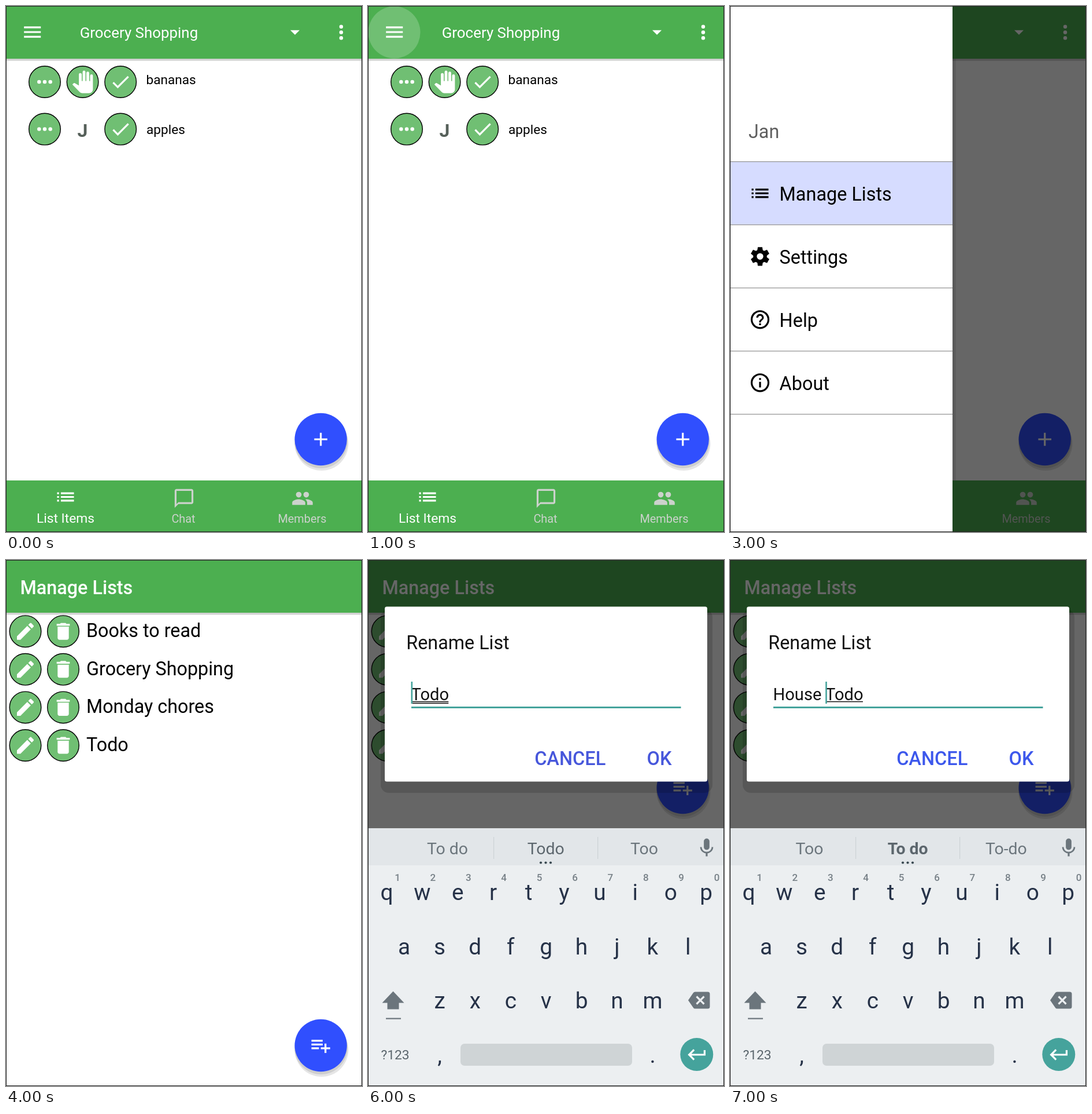
Recreate the animation shown at these times as an HTML page. Size 616 by 908 pixels, loop 8000 ms.

```html
<!DOCTYPE html>
<html lang="en">
<head>
<meta charset="utf-8">
<title>List app</title>
<style>
html, body { margin: 0; width: 616px; height: 908px; overflow: hidden; background: #fff; }
svg { display: block; font-family: Roboto, sans-serif; }
</style>
</head>
<body>
<svg id="stage" width="616" height="908" viewBox="0 0 616 908"></svg>
<script>
const GREEN = '#4caf50', SOFT = '#70bf73', BLUE = '#304ffe', TEAL = '#45a39c', GREY = '#6b757c';
const DP = 1.616; // pixels per icon unit
const STEP = 1000;

// Icon shapes on a 24 unit grid
const ring = '<circle cx="12" cy="12" r="9" fill="none" stroke="#000" stroke-width="2"/>';
const p = d => `<path d="${d}"/>`;
const dots = pts => pts.map(([x, y]) => `<circle cx="${x}" cy="${y}" r="2"/>`).join('');
const tooth = a => `<path d="M-3-6L-2.4-10H2.4L3-6z" transform="translate(12 12) rotate(${a})"/>`;
const ICONS = {
  menu: p('M3 18h18v-2H3zm0-5h18v-2H3zm0-7v2h18V6z'),
  drop: p('M7 10l5 5 5-5z'),
  more: dots([[12, 6], [12, 12], [12, 18]]),
  dots: dots([[6, 12], [12, 12], [18, 12]]),
  done: p('M9 16.2L4.8 12l-1.4 1.4L9 19 21 7l-1.4-1.4z'),
  hand: p('M23 5.5V20c0 2.2-1.8 4-4 4h-7.3c-1.08 0-2.1-.43-2.85-1.19L1 14.83s1.26-1.23 1.3-1.25c.4-.35.95-.37 1.39-.13L8 15.91V4a1.5 1.5 0 0 1 3 0v7h1V1.5a1.5 1.5 0 0 1 3 0V11h1V2.5a1.5 1.5 0 0 1 3 0V11h1V5.5a1.5 1.5 0 0 1 3 0z'),
  add: p('M19 13h-6v6h-2v-6H5v-2h6V5h2v6h6z'),
  list: p('M3 13h2v-2H3zm0 4h2v-2H3zm0-8h2V7H3zm4 4h14v-2H7zm0 4h14v-2H7zM7 7v2h14V7z'),
  chat: p('M20 2H4c-1.1 0-2 .9-2 2v18l4-4h14c1.1 0 2-.9 2-2V4c0-1.1-.9-2-2-2zm0 14H6l-2 2V4h16z'),
  people: '<circle cx="8" cy="8" r="3"/><circle cx="16" cy="8" r="3"/>' +
    p('M8 13c-2.33 0-7 1.17-7 3.5V19h14v-2.5c0-2.33-4.67-3.5-7-3.5zm8 0c-.29 0-.62.02-.97.05 1.16.84 1.97 1.97 1.97 3.45V19h6v-2.5c0-2.33-4.67-3.5-7-3.5z'),
  gear: '<circle cx="12" cy="12" r="5.4" fill="none" stroke="#000" stroke-width="3.8"/>' +
    [0, 60, 120, 180, 240, 300].map(tooth).join(''),
  help: ring + p('M11 18h2v-2h-2zM12 6c-2.21 0-4 1.79-4 4h2c0-1.1.9-2 2-2s2 .9 2 2c0 2-3 1.75-3 5h2c0-2.25 3-2.5 3-5 0-2.21-1.79-4-4-4z'),
  info: ring + p('M11 17h2v-6h-2zM11 9h2V7h-2z'),
  edit: p('M3 17.25V21h3.75L17.81 9.94l-3.75-3.75zM20.71 7.04c.39-.39.39-1.02 0-1.41l-2.34-2.34c-.39-.39-1.02-.39-1.41 0l-1.83 1.83 3.75 3.75z'),
  bin: p('M6 19c0 1.1.9 2 2 2h8c1.1 0 2-.9 2-2V7H6zM19 4h-3.5l-1-1h-5l-1 1H5v2h14z'),
  addList: p('M14 10H2v2h12zm0-4H2v2h12zm4 8v-4h-2v4h-4v2h4v4h2v-4h4v-2zM2 16h8v-2H2z'),
  mic: p('M12 14c1.66 0 3-1.34 3-3V5c0-1.66-1.34-3-3-3S9 3.34 9 5v6c0 1.66 1.34 3 3 3zm5.3-3c0 3-2.54 5.1-5.3 5.1S6.7 14 6.7 11H5c0 3.41 2.72 6.23 6 6.72V21h2v-3.28c3.28-.48 6-3.3 6-6.72z'),
  enter: p('M19 7v4H5.83l3.58-3.59L8 6l-6 6 6 6 1.41-1.41L5.83 13H21V7z')
};

const icon = (name, x, y, fill = '#fff') =>
  `<g fill="${fill}" transform="translate(${x} ${y}) scale(${DP}) translate(-12 -12)">${ICONS[name]}</g>`;
const rect = (x, y, w, h, fill, rx = 0) =>
  `<rect x="${x}" y="${y}" width="${w}" height="${h}" rx="${rx}" fill="${fill}"/>`;
const disc = (x, y, r, fill, extra = '') => `<circle cx="${x}" cy="${y}" r="${r}" fill="${fill}" ${extra}/>`;
const text = (s, x, y, size, fill = '#000', weight = 400, anchor = 'start') =>
  `<text x="${x}" y="${y}" font-size="${size}" fill="${fill}" font-weight="${weight}" text-anchor="${anchor}">${s}</text>`;
const mid = (s, x, y, size, fill, weight) => text(s, x, y, size, fill, weight, 'middle');

const button = (name, x, y, down) =>
  disc(x, y, down ? 26.5 : 27.3, down ? GREEN : SOFT, `stroke="#000" stroke-width="${down ? 3 : 1.4}"`) + icon(name, x, y);
const fab = (name, y) =>
  disc(546, y + 7.5, 46.5, '#000', 'opacity=".1"') + disc(545, y + 4, 46, '#000', 'opacity=".1"') +
  disc(544.7, y, 45.2, BLUE) + icon(name, 544.7, y);
const dim = rect(0, 0, 616, 908, 'rgba(0,0,0,.6)');
const bar = rect(0, 0, 616, 91, GREEN) + rect(0, 91, 616, 3.5, '#d2d2d2');

function home(pressed) {
  const row = y => button('dots', 67, y) + button('done', 198.2, y);
  return bar + (pressed ? disc(45.5, 45.5, 45, SOFT) : '') +
    icon('menu', 45.7, 45) + text('Grocery Shopping', 127.7, 55, 25.9, '#fff') +
    icon('drop', 500, 45) + icon('more', 580, 45.5) +
    row(131) + button('hand', 132.6, 131) + text('bananas', 242.6, 135, 22.6) +
    row(212.6) + mid('J', 132.5, 225.5, 32, '#56605a', 700) + text('apples', 243, 220.5, 22.6) +
    fab('add', 748) + rect(0, 819, 616, 89, GREEN) +
    icon('list', 103, 847.5) + mid('List Items', 103, 892, 22.8, '#fff') +
    icon('chat', 308, 850, '#ccd2cc') + mid('Chat', 307, 892, 19.9, '#ccd2cc') +
    icon('people', 513, 850, '#ccd2cc') + mid('Members', 512.5, 892, 19.9, '#ccd2cc');
}

function drawer(pressed) {
  const items = [['list', 'Manage Lists'], ['gear', 'Settings'], ['help', 'Help'], ['info', 'About']];
  return home(false) + dim + rect(385, 91, 5.5, 728, 'rgba(0,0,0,.12)') + rect(0, 0, 385, 908, '#fff') +
    (pressed ? rect(0, 269, 385, 108.5, '#d6dcff') : '') +
    text('Jan', 32, 227.5, 32.3, '#5f5f5f') + rect(0, 268, 385, 1.3, '#999') +
    items.map(([name, label], i) => {
      const y = 109 * i;
      return icon(name, 52, 323.3 + y, '#000') + text(label, 85.6, 336 + y, 32.4) +
        rect(0, 377 + y, 385, 1.3, '#999');
    }).join('');
}

function lists(pressed, fabY = 838) {
  return bar + text('Manage Lists', 24.5, 58.5, 32.3, '#fff', 500) +
    ['Books to read', 'Grocery Shopping', 'Monday chores', 'Todo'].map((label, i) => {
      const y = 123.2 + 65.6 * i;
      return button('edit', 33.5, y, pressed && i === 3) + button('bin', 99, y) +
        text(label, 139, y + 10, 32.3);
    }).join('') + fab('addList', fabY);
}

function keyboard(words, weight) {
  const ink = '#263248', step = 61.4;
  const keys = (s, x, y) => [...s].map((c, i) => mid(c, x + step * i, y, 38.8, ink)).join('');
  return rect(0, 463, 616, 445, '#eceff1') + rect(0, 463, 616, 64, '#e2e6e9') +
    rect(217, 478, 1.2, 38, '#cdd2d5') + rect(397, 478, 1.2, 38, '#cdd2d5') +
    words.map((w, i) => mid(w, 137.5 + 170.2 * i, 508, 28.4, i === 1 ? '#5c666d' : GREY, i === 1 ? weight : 400)).join('') +
    [299, 307.5, 316].map(x => disc(x, 522.5, 2.1, '#37474f')).join('') + icon('mic', 586, 497, GREY) +
    keys('qwertyuiop', 32.5, 587) + keys('asdfghjkl', 62.5, 681) + keys('zxcvbnm', 124, 774) +
    [...'1234567890'].map((c, i) => mid(c, 51 + step * i, 553.5, 17, '#778087', 500)).join('') +
    `<path d="M43.5 744.5L62.5 764.5H53.5V775.5H33.5V764.5H24.5z" fill="${GREY}"/>` + rect(31, 790.5, 26, 2.2, GREY) +
    `<path d="M566 745.5H588Q591.5 745.5 591.5 749V771Q591.5 774.5 588 774.5H566Q564 774.5 563 773L554 760 563 747Q564 745.5 566 745.5z" fill="${GREY}"/>` +
    '<path d="M568.5 753.5l13 13m0-13l-13 13" stroke="#eceff1" stroke-width="3.2"/>' +
    mid('?123', 47, 862, 22.8, '#5b666d') + mid(',', 124, 867.5, 38.8, ink) + mid('.', 492.7, 867.5, 38.8, ink) +
    rect(160, 835, 297, 38, '#cfd4d6', 7) + disc(568.8, 853.5, 28.5, TEAL) + icon('enter', 569.5, 854);
}

function rename(typed) {
  const x = typed ? 166 : 75.3, action = typed ? '#3d58ec' : '#4757db';
  const button = (s, cx) => mid(s, cx, 353.5, 32.5, action, 500);
  return lists(false, 393) + dim + rect(22, 85, 574, 317, 'rgba(0,0,0,.15)', 14) +
    rect(29, 80.5, 558, 302, '#fff', 3.5) + text('Rename List', 66.3, 154, 32.3, '#111') +
    text(typed ? 'House Todo' : 'Todo', 74.5, 242, 29.1, '#111') +
    rect(x, 243.8, 64, 1.5, '#111') + (typed ? '' : rect(x, 246.6, 64, 1.5, '#111')) +
    rect(x - .8, 210, 2.6, 38, TEAL) + rect(75, 253, 466.5, 3, TEAL) +
    button('CANCEL', 349.7) + button('OK', 504) +
    keyboard(typed ? ['Too', 'To do', 'To-do'] : ['To do', 'Todo', 'Too'], typed ? 700 : 400);
}

const frame = '<rect x=".5" y=".5" width="615" height="907" fill="none" stroke="#222"/>';
const scenes = [
  home(false), home(true), drawer(false), drawer(true),
  lists(false), lists(true), rename(false), rename(true)
];

const stage = document.getElementById('stage');
let shown = -1;
function draw(t) {
  const i = Math.floor(t / STEP) % scenes.length;
  if (i !== shown) {
    stage.innerHTML = rect(0, 0, 616, 908, '#fff') + scenes[i] + frame;
    shown = i;
  }
}
const start = performance.now();
function tick() {
  draw(performance.now() - start);
  requestAnimationFrame(tick);
}
tick();
</script>
</body>
</html>
```
